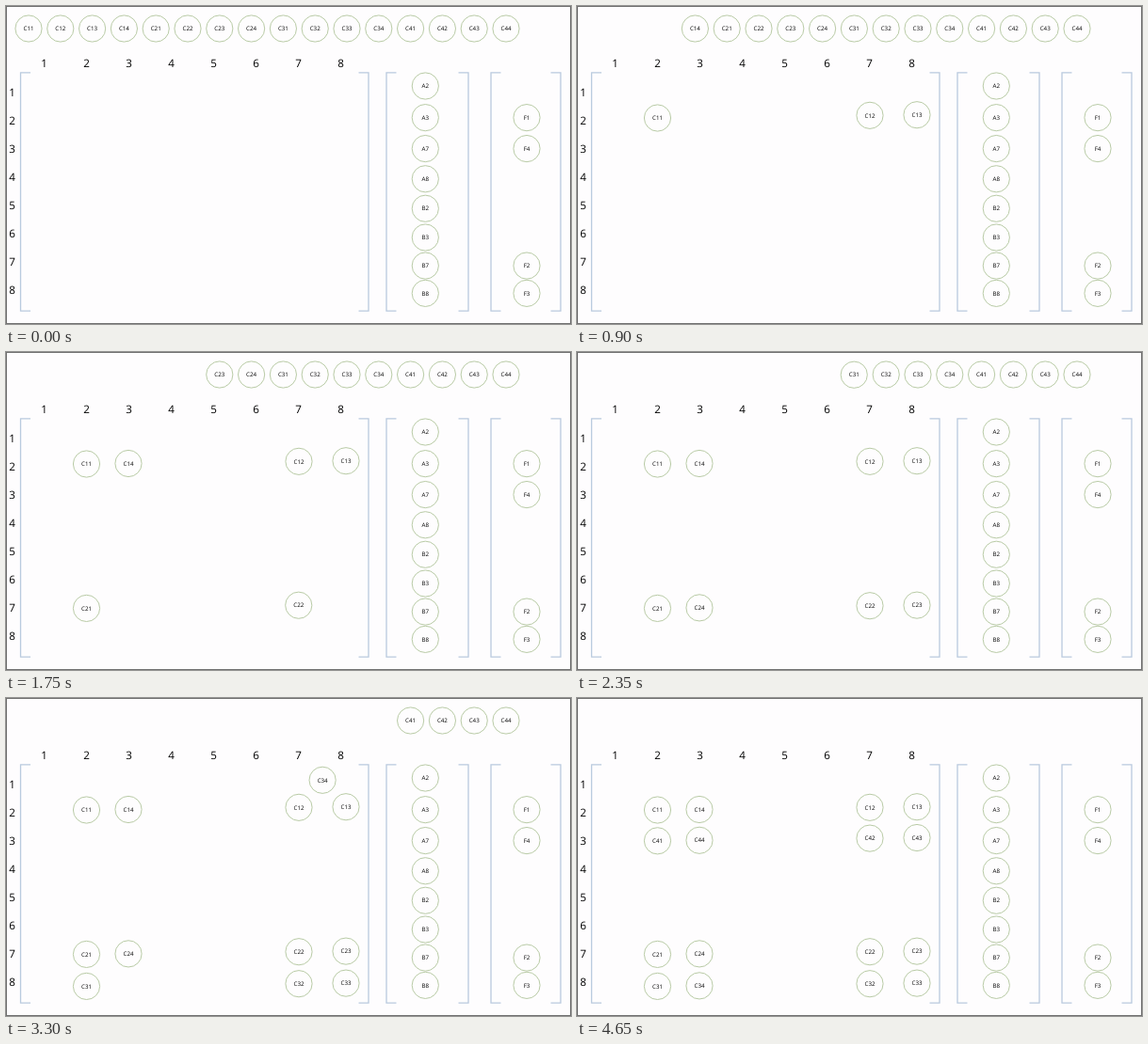
These frames come from a looping animation (600x338 px, 4.75 s). An HTML page:

```html
<!DOCTYPE html>
<html lang="en">
<head>
<meta charset="utf-8">
<title>Matrix assembly</title>
<style>
  html, body { margin: 0; width: 100%; height: 100%; overflow: hidden; }
  svg { display: block; width: 600px; height: 338px; background: #fefdfe; }
  text { font-family: "Open Sans", "Noto Sans", sans-serif; text-anchor: middle; text-rendering: geometricPrecision; }
  .axis { font-size: 11.6px; }
  .label { font-size: 6.2px; }
  circle { fill: #fefdfe; stroke: #b9cba6; }
  path { fill: none; stroke: #b9cade; stroke-width: 1.3; }
  .frame { fill: none; stroke: #707070; }
</style>
</head>
<body>
<svg id="stage" viewBox="0 0 600 338"></svg>
<script>
const LOOP = 4750, STEP = 50;
const FIRST = 33, PERIOD = 289, TRAVEL = 280;
const TOP = 24;
const stage = document.getElementById('stage');

function add(parent, tag, attrs, content = '') {
  const node = document.createElementNS('http://www.w3.org/2000/svg', tag);
  for (const key in attrs) node.setAttribute(key, attrs[key]);
  node.textContent = content;
  return parent.appendChild(node);
}

function place(node, x, y) {
  node.setAttribute('transform', `translate(${x.toFixed(2)} ${y.toFixed(2)})`);
}

function disc(name, x, y) {
  const group = add(stage, 'g', {});
  add(group, 'circle', { r: 14.1 });
  add(group, 'text', { class: 'label', y: 2.2 }, name);
  place(group, x, y);
  return group;
}

function brackets(left, right) {
  const tick = 10.5;
  add(stage, 'path', { d: `M${left + tick} 70.8H${left}V324.2h${tick}` });
  add(stage, 'path', { d: `M${right - tick} 70.8H${right}V324.2h${-tick}` });
}

// Vector entries sit slightly closer together further down.
const entryY = row => 85 + 34 * row - 0.36 * row * row;

add(stage, 'rect', { class: 'frame', x: 0.5, y: 0.5, width: 599, height: 337 });
for (let i = 0; i < 8; i++) {
  add(stage, 'text', { class: 'axis', x: 40.5 + 45 * i, y: 65.3 }, i + 1);
  add(stage, 'text', { class: 'axis', x: 6.5, y: 95.8 + 30 * i }, i + 1);
}
brackets(15.5, 385);
brackets(404, 491);
brackets(515, 589);

['A2', 'A3', 'A7', 'A8', 'B2', 'B3', 'B7', 'B8']
  .forEach((name, row) => disc(name, 445.3, entryY(row)));
[1, 6, 7, 2].forEach((row, i) => disc(`F${i + 1}`, 553, entryY(row)));

// Element indices 1-4 land on the global indices 2, 7, 8, 3.
const columnX = [85.5, 311, 361, 130];
const rowY = [117.4, 270.8, 304.8, 150.2];
const TILT = 0.012;

const moves = Array.from({ length: 16 }, (_, i) => {
  const row = Math.floor(i / 4), column = i % 4;
  const startX = 24 + 33.8 * i;
  const endX = columnX[column];
  return {
    startX, endX,
    endY: rowY[row] - TILT * (endX - 220),
    begin: FIRST + PERIOD * i,
    node: disc(`C${row + 1}${column + 1}`, startX, TOP)
  };
});

function draw(time) {
  const t = Math.floor(time % LOOP / STEP) * STEP;
  for (const m of moves) {
    const p = Math.min(1, Math.max(0, (t - m.begin) / TRAVEL));
    const eased = (1 - Math.cos(Math.PI * p)) / 2;
    place(m.node, m.startX + (m.endX - m.startX) * eased, TOP + (m.endY - TOP) * eased);
  }
}

const origin = performance.now();
function tick() {
  draw(performance.now() - origin);
  requestAnimationFrame(tick);
}
tick();
</script>
</body>
</html>
```
